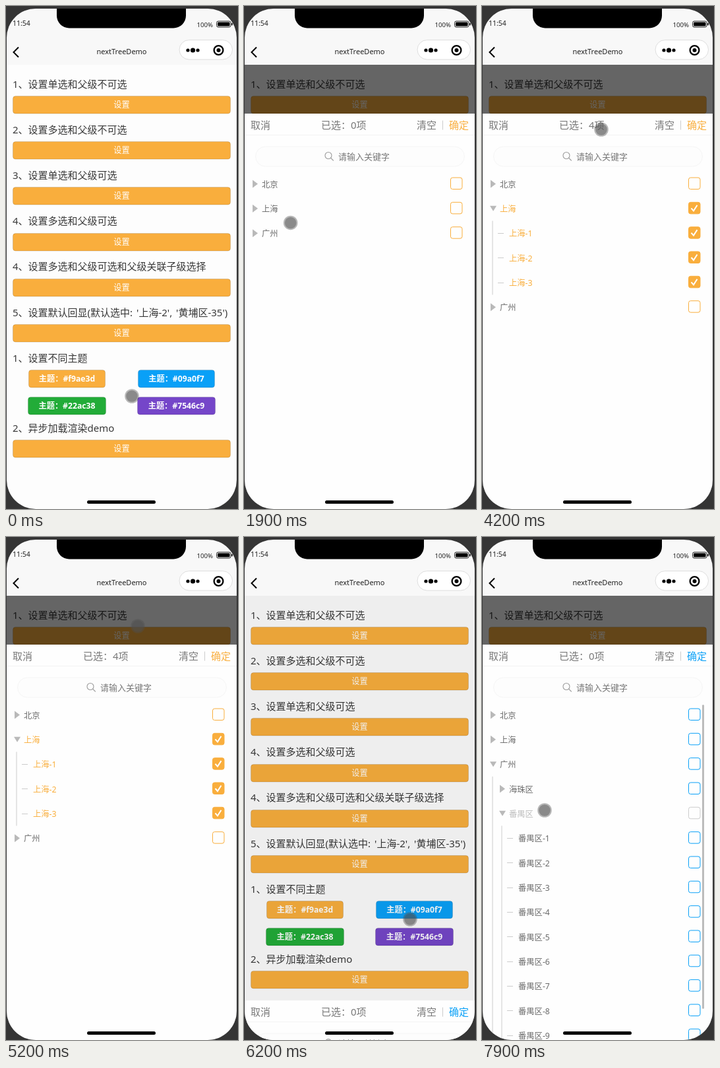
These frames come from a looping animation (352x762 px, 8 s). An HTML page with a canvas:

```html
<!DOCTYPE html>
<html lang="zh-CN">
<head>
<meta charset="utf-8">
<title>nextTreeDemo</title>
<style>
html, body { margin: 0; width: 100%; height: 100%; overflow: hidden; background: #333; }
canvas { display: block; width: 352px; height: 762px; }
</style>
</head>
<body>
<canvas id="stage"></canvas>
<script>
const W = 352, H = 762, LOOP = 8000;
const canvas = document.getElementById('stage');
const ctx = canvas.getContext('2d');
const dpr = window.devicePixelRatio || 1;
canvas.width = W * dpr;
canvas.height = H * dpr;

const FONT = '"Noto Sans", "Noto Sans CJK SC", "Noto Sans CJK", sans-serif';
const ORANGE = '#f9ae3d', BLUE = '#09a0f7', GREEN = '#22ac38', PURPLE = '#7546c9';
const BAR = 89, SHEET_TOP = 163, SHEET_H = H - SHEET_TOP, FADE = 300;
const PITCH = 69.2, ROW_H = 37.33;
const rowY = (i, top = SHEET_TOP) => top + 106.5 + i * ROW_H;

// When the sheet opens and closes, and when items are tapped
const sessions = [
  { open: 1152, close: 5384, theme: ORANGE },
  { open: 6170, close: Infinity, theme: BLUE }
];
const tap = { shanghai: 2100, second: 2550, third: 2980, all: 3600, guangzhou: 7280, panyu: 7600 };

// Pointer stops: arrival time, x, y
const stops = [
  [0, 191, 591], [800, 255, 582], [1190, 172, 414],
  [2050, 45, rowY(1)], [2500, 320, rowY(3)], [2850, 320, rowY(4) + 3], [3550, 322, rowY(2)],
  [4150, 181, 187], [4700, 110, 180], [5200, 200, 135], [5490, 178, 454],
  [6150, 252, 579], [7000, 58, rowY(2)], [7550, 60, rowY(4)], [7880, 95, 414]
];

// cubic-bezier(.25, .1, .25, 1)
function ease(p) {
  if (p <= 0) return 0;
  if (p >= 1) return 1;
  const bez = (a, b, s) => 3 * a * s * (1 - s) ** 2 + 3 * b * s * s * (1 - s) + s ** 3;
  let lo = 0, hi = 1;
  for (let i = 0; i < 24; i++) {
    const mid = (lo + hi) / 2;
    if (bez(.25, .25, mid) < p) lo = mid; else hi = mid;
  }
  return bez(.1, 1, lo);
}

// Rests after each stop, then moves during the last part of the gap
function pointer(t) {
  const next = stops.findIndex(s => s[0] > t);
  if (next < 0) return stops[stops.length - 1].slice(1);
  const [t0, x0, y0] = stops[next - 1], [t1, x1, y1] = stops[next];
  const p = Math.max(0, 1 - (t1 - t) / ((t1 - t0) * .6));
  const s = p * p * (3 - 2 * p);
  return [x0 + (x1 - x0) * s, y0 + (y1 - y0) * s];
}

// y is the vertical middle of the glyphs
function text(str, x, y, size, color, align = 'left', weight = 400) {
  ctx.font = `${weight} ${size}px ${FONT}`;
  ctx.textAlign = align;
  ctx.fillStyle = color;
  ctx.fillText(str, x, y + size * .37);
}

function rect(x, y, w, h, color) {
  ctx.fillStyle = color;
  ctx.fillRect(x, y, w, h);
}

function paint(fill, stroke, width = 1) {
  if (fill) { ctx.fillStyle = fill; ctx.fill(); }
  if (stroke) { ctx.strokeStyle = stroke; ctx.lineWidth = width; ctx.stroke(); }
}

function round(x, y, w, h, r, fill, stroke) {
  ctx.beginPath();
  ctx.roundRect(x, y, w, h, r);
  paint(fill, stroke);
}

function circle(x, y, r, fill, stroke, width) {
  ctx.beginPath();
  ctx.arc(x, y, r, 0, Math.PI * 2);
  paint(fill, stroke, width);
}

function poly(points, fill, stroke, width) {
  ctx.beginPath();
  points.forEach(([x, y]) => ctx.lineTo(x, y));
  paint(fill, stroke, width);
}

function button(x, y, w, label, color, weight) {
  round(x + .5, y + .5, w - 1, 26.5, 4, color, 'rgba(0,0,0,.13)');
  text(label, x + w / 2, y + 13.8, 12.2, '#fff', 'center', weight);
}

function page() {
  const ink = '#383838';
  const titles = [
    '1、设置单选和父级不可选', '2、设置多选和父级不可选', '3、设置单选和父级可选', '4、设置多选和父级可选',
    '4、设置多选和父级可选和父级关联子级选择', "5、设置默认回显(默认选中: '上海-2', '黄埔区-35')"
  ];
  rect(0, BAR, W, H - BAR, '#fdfdfd');
  titles.forEach((title, i) => {
    text(title, 10, 118 + i * PITCH, 15, ink);
    button(10, Math.round(136 + i * PITCH), 331, '设置', ORANGE);
  });
  text('1、设置不同主题', 10, 533, 15, ink);
  [ORANGE, BLUE, GREEN, PURPLE].forEach((color, i) => {
    const row = i >> 1;
    button(34 - row + (i % 2) * 166, 551 + row * 41, 117 + row * 2, '主题：' + color, color, 600);
  });
  text('2、异步加载渲染demo', 10, 639, 15, ink);
  button(10, 657, 331, '设置', ORANGE);
}

function checkbox(y, color, on) {
  round(313.5, y - 9, 17.5, 17.5, 3, on ? color : null, color);
  if (on) poly([[317.5, y], [321, y + 4], [326.5, y - 4.5]], null, '#fff', 2);
}

function arrow(x, y, open) {
  const pts = open ? [[-1, -4], [9, -4], [4, 4]] : [[0, -6], [8, 0], [0, 6]];
  poly(pts.map(([dx, dy]) => [x + dx, y + dy]), '#b9b9b9');
}

// Visible tree rows at a time
function treeRows(t) {
  const rows = [];
  const add = (name, level, extra) => rows.push({ name, level, ...extra });
  const first = t < sessions[1].open;
  const all = first && t >= tap.all;
  const openS = first && t >= tap.shanghai;
  const openG = t >= tap.guangzhou, openP = t >= tap.panyu;
  add('北京', 0, { parent: true });
  add('上海', 0, { parent: true, open: openS, on: all, kids: openS ? 3 : 0 });
  if (openS) {
    add('上海-1', 1, { on: all });
    add('上海-2', 1, { on: t >= tap.second });
    add('上海-3', 1, { on: t >= tap.third });
  }
  add('广州', 0, { parent: true, open: openG, kids: openP ? 12 : openG ? 2 : 0 });
  if (openG) {
    add('海珠区', 1, { parent: true });
    add('番禺区', 1, { parent: true, open: openP, off: true, kids: openP ? 10 : 0 });
  }
  if (openP) for (let n = 1; n <= 10; n++) add('番禺区-' + n, 2);
  return rows;
}

function tree(rows, top, theme) {
  rows.forEach((row, i) => {
    const y = rowY(i, top), x = 13 + row.level * 14;
    if (row.parent) arrow(x, y, row.open);
    else rect(x - 3, Math.round(y), 9, 1, '#ccc');
    if (row.kids) rect(x + 2.5, y + ROW_H / 2, 1, row.kids * ROW_H, '#ccc');
    text(row.name, x + 14, y + .7, 12.3, row.off ? '#bdbdbd' : row.on ? theme : '#6a6a6a');
    checkbox(y - .5, row.off ? '#ccc' : theme, row.on);
  });
  // Scrollbar when the list is taller than its view
  const listTop = top + 91, view = H - listTop, full = rows.length * ROW_H;
  if (full > view) round(334, listTop, 3, view * view / full, 1.5, '#bcbcbc');
}

function sheet(t) {
  const s = sessions.find(k => t >= k.open && t < k.close + FADE);
  if (!s) return;
  const closing = t >= s.close;
  const shown = closing ? 1 - ease((t - s.close) / FADE) : ease((t - s.open) / FADE);
  const top = H - SHEET_H * shown, mid = top + 17.5, grey = '#777';
  const rows = closing ? [] : treeRows(t);
  const count = rows.filter(r => r.on).length;
  rect(0, BAR, W, H - BAR, `rgba(0,0,0,${.6 * shown})`);
  rect(0, top, W, SHEET_H, '#fefefe');

  text('取消', 10, mid, 15, grey);
  text('已选：' + count + '项', 117, mid, 15, grey);
  text('清空', 262, mid, 15, grey);
  rect(301, mid - 7, 1, 14, '#ccc');
  text('确定', 341, mid, 15, s.theme, 'right');
  rect(0, top + 32, W, 1, '#f3f3f3');

  round(17.5, top + 50, 317, 30, 15, '#fdfdfd', '#f5f5f5');
  circle(128, top + 63.5, 5, null, '#999', 1.1);
  poly([[131.6, top + 67.2], [135.8, top + 71.4]], null, '#999', 1.2);
  text('请输入关键字', 143, top + 65, 13, grey);
  tree(rows, top, s.theme);
}

function header() {
  rect(0, 0, W, BAR, '#f8f8f8');
  text('11:54', 10, 26, 10.5, '#222');
  text('100%', 314, 28, 9.6, '#222', 'right');
  round(319.5, 23, 21.5, 9, 2.5, null, '#222');
  round(321, 24.5, 18.5, 6, 1.2, '#000');
  round(342, 25.5, 1.8, 4, 1, '#222');
  poly([[19, 62.5], [11.5, 70], [19, 77.5]], null, '#000', 2);
  text('nextTreeDemo', 175.5, 69, 11, '#222', 'center');
  round(263, 51.5, 80.5, 29.5, 14.75, '#fff', '#dedede');
  for (const side of [-1, 0, 1]) circle(283.5 + side * 7.5, 67, side ? 2.6 : 3.6, '#000');
  circle(322.5, 67, 6.9, null, '#000', 2.3);
  circle(322.5, 67, 3, '#000');
}

function draw(t) {
  ctx.setTransform(dpr, 0, 0, dpr, 0, 0);
  ctx.wordSpacing = '2px';
  rect(0, 0, W, H, '#353535');
  ctx.save();
  ctx.beginPath();
  ctx.roundRect(1, 4, 349, 758, 44);
  ctx.clip();
  page();
  sheet(t);
  header();
  round(77, 0, 196, 33.5, [0, 0, 19, 19], '#000');
  round(123, 749, 104, 5, 2.5, '#000');
  ctx.restore();
  const [x, y] = pointer(t);
  circle(x, y, 10.8, 'rgba(80,80,80,.4)');
  circle(x, y, 8.8, 'rgba(80,80,80,.44)');
}

function frame() {
  draw(performance.now() % LOOP);
  requestAnimationFrame(frame);
}
frame();
</script>
</body>
</html>
```
